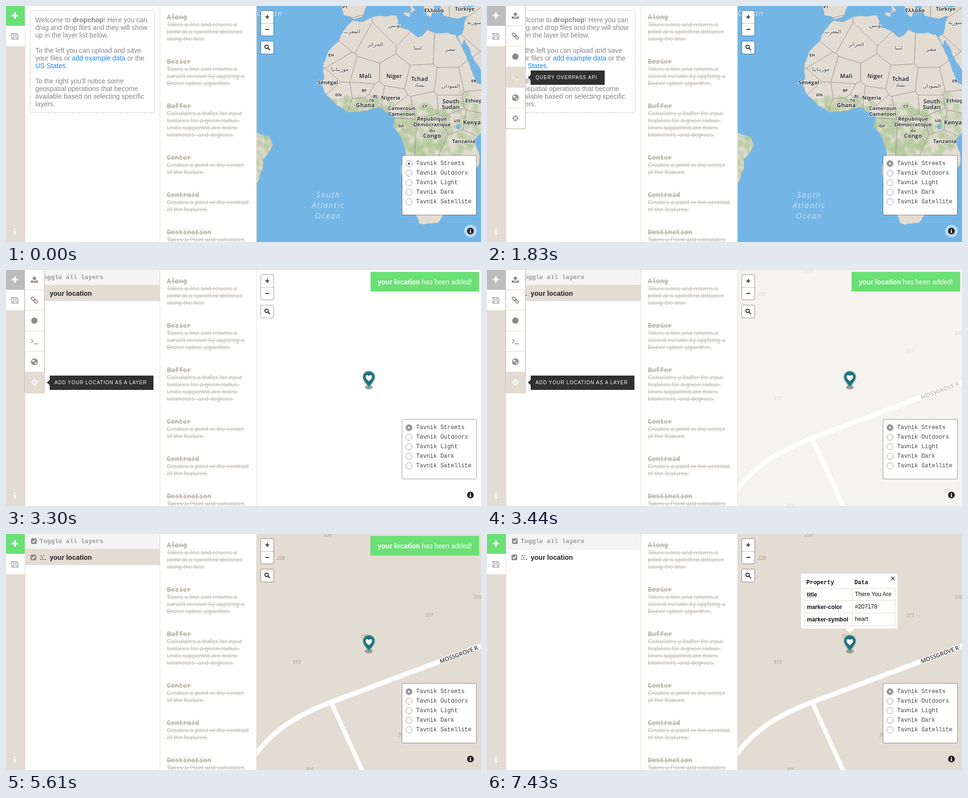
Animation of 989 by 494 pixels, one loop 8000 ms. Source, as an HTML page:

```html
<!DOCTYPE html>
<html lang="en">
<head>
<meta charset="utf-8">
<title>dropchop</title>
<style>
html, body { margin: 0; width: 100%; height: 100%; overflow: hidden; background: #fff; }
svg { display: block; width: 100%; height: 100%; }
text { font-family: 'Liberation Sans', Arial, sans-serif; font-size: 14px; white-space: pre; }
.b { font-weight: bold; }
.small { font-size: 12px; }
.mono { font-family: 'Liberation Mono', monospace; font-size: 12px; }
.desc { font-size: 12px; letter-spacing: .34px; text-decoration: line-through; }
.tip { font-size: 10px; letter-spacing: 1px; }
.place { font-family: 'Open Sans', 'DejaVu Sans', sans-serif; font-weight: bold; text-anchor: middle;
  stroke: #fffc; stroke-width: 2px; paint-order: stroke; stroke-linejoin: round; }
.height { font: italic 10px 'Open Sans', sans-serif; text-anchor: middle; }
.road { font: 600 12px 'Open Sans', sans-serif; stroke: #fff; stroke-width: 3px; paint-order: stroke; }
.sea { font: italic 16px 'Open Sans', sans-serif; letter-spacing: 2px; }
.line { fill: none; stroke: currentColor; }
</style>
</head>
<body>
<svg id="stage" viewBox="0 0 989 494"></svg>
<script>
const LOOP = 8000;
const SAND = '#e3dcd2', GREEN = '#6adf75', GREY = '#bcbcbc', SEA = '#73b6e6';

const text = (x, y, s, color, cls = '', more = '') =>
  `<text x="${x}" y="${y}" fill="${color}" class="${cls}" ${more}>${s}</text>`;
const rect = (x, y, w, h, color, more = '') =>
  `<rect x="${x}" y="${y}" width="${w}" height="${h}" fill="${color}" ${more}/>`;
const circle = (x, y, r, color, more = '') => `<circle cx="${x}" cy="${y}" r="${r}" fill="${color}" ${more}/>`;
const group = (id, body) => `<g id="${id}">${body}</g>`;
const at = (x, y, body, more = '') => `<g transform="translate(${x} ${y})" ${more}>${body}</g>`;
const stroke = (d, w) => `<path class="line" stroke-width="${w}" d="${d}"/>`;
const fill = d => `<path fill="currentColor" fill-rule="evenodd" d="${d}"/>`;
const bold = s => `<tspan class="b">${s}</tspan>`;
const repeat = (n, f) => Array.from({ length: n }, (_, i) => f(i)).join('');

let seed = 7;
const random = () => (seed = seed * 16807 % 2147483647) / 2147483647;
const polygon = pts => 'M' + pts.map(p => p.map(v => v.toFixed(1)).join(' ')).join('L') + 'Z';

// Coastlines: a few key points, roughened by midpoint displacement
const split = (a, b) => {
  const d = Math.hypot(b[0] - a[0], b[1] - a[1]);
  if (d < 5) return [a];
  const m = [0, 1].map(i => (a[i] + b[i]) / 2 + (random() - .5) * d * .16);
  return [...split(a, m), ...split(m, b)];
};
const coast = s => {
  const pts = s.split(',').map(p => p.trim().split(' ').map(Number));
  return polygon(pts.flatMap((p, i) => split(p, pts[(i + 1) % pts.length])));
};
const africa = `722 30,702 52,689 77,672 93,661 120,661 155,657 163,662 178,690 209,711 222,743 220,777 211,790 222,
  808 224,805 252,823 276,833 310,822 345,840 405,860 455,870 458,901 453,931 425,954 375,985 332,985 307,976 280,
  1010 236,1010 175,980 161,965 121,939 68,936 60,897 57,878 48,868 61,857 65,843 53,817 44,813 19,771 21,743 33`;
const eurasia = ['700 -5,703 20,717 22,722 27,742 22,753 -5', '840 -5,852 8,846 14,826 15,841 23',
  '868 -5,877 20,885 23,893 -5', '889 33,896 32,903 34',
  '905 -5,910 20,940 27,959 21,949 59,939 65,949 83,954 71,999 160,1010 -5'];
const brazil = '515 263,548 273,556 290,544 311,535 321,528 361,515 385';
const land = [africa, ...eurasia, brazil].map(coast).join('');

// Labels; a bar splits lines
const places = [
  [891, 9, 'Ελλάδα'], [955, 6, 'Türkiye'], [706, 1, 'PT'], [975, 34, 'سورية'], [809, 40, 'تونس'], [720, 53, 'المغرب'],
  [769, 80, 'الجزائر'], [857, 87, 'ليبيا'], [925, 90, 'مصر'], [677, 102, 'EH'], [695, 132, 'موريتانيا'], [748, 147, 'Mali'],
  [808, 147, 'Niger'], [861, 159, 'Tchad|تشاد'], [926, 167, 'السودان'], [974, 156, 'ER'], [670, 160, 'Sénégal'],
  [692, 185, 'GN'], [746, 176, 'BF'], [769, 188, 'BJ'], [761, 197, 'TG'], [748, 208, 'Ghana'], [801, 192, 'Nigeria'],
  [824, 220, 'Cameroun|Cameroon'], [872, 209, 'CF'], [926, 206, 'South|Sudan'], [979, 198, 'Ethiopia'],
  [887, 254, 'République|Démocratique|du|Congo'], [939, 239, 'UG'], [970, 244, 'Kenya'], [822, 250, 'GA'], [953, 283, 'Tanzania']
];
const label = ([x, y, s]) => s.split('|').map((line, i, all) => {
  const arabic = line > '\u0600', size = line.length < 3 ? 9 : line.length < 6 && !arabic ? 12 : 11;
  return text(x, y + 4 + 12 * (i - (all.length - 1) / 2), line, '#333', 'place',
    `style="font-size:${size}px${arabic ? ';font-weight:400' : ''}"`);
}).join('');

// Borders lie halfway between neighbouring labels
const nearer = (poly, a, b) => {
  const side = p => (p[0] - (a[0] + b[0]) / 2) * (b[0] - a[0]) + (p[1] - (a[1] + b[1]) / 2) * (b[1] - a[1]);
  return poly.flatMap((p, i) => {
    const q = poly[(i + 1) % poly.length], s = side(p), t = side(q), k = s / (s - t);
    const out = s <= 0 ? [p] : [];
    if (s * t < 0) out.push([p[0] + (q[0] - p[0]) * k, p[1] + (q[1] - p[1]) * k]);
    return out;
  });
};
const frame = [[560, -20], [1020, -20], [1020, 520], [560, 520]];
const borders = places.map(a => polygon(places.reduce((p, b) => a === b ? p : nearer(p, a, b), frame))).join('');

const forest = (x, y, rx, ry, n) => repeat(n, () => {
  const r = Math.sqrt(random()), a = random() * 2 * Math.PI;
  return circle((x + rx * r * Math.cos(a)).toFixed(1), (y + ry * r * Math.sin(a)).toFixed(1), (2 + 5 * random()).toFixed(1), '#adc997');
});
const world = rect(522, 0, 467, 494, SEA) + `<path d="${land}" fill="${SAND}"/>
  <g clip-path="url(#land)"><g filter="url(#soft)" fill-opacity=".42">` +
  forest(735, 207, 75, 16, 90) + forest(866, 256, 64, 52, 300) + forest(885, 315, 62, 35, 110) +
  forest(955, 240, 36, 62, 110) + forest(535, 315, 24, 55, 90) +
  `</g><path d="${borders}" fill="none" stroke="#a0949a" stroke-width=".8"/></g>
  <path d="${land}" fill="none" stroke="#6fa3c6" stroke-width=".5"/>` +
  circle(942, 253, 5, SEA) + places.map(label).join('') +
  text(522, 21, 'Ocean', '#c8e2f6', 'sea') +
  ['South', 'Atlantic', 'Ocean'].map((s, i) => text(671, 401 + 22 * i, s, '#c8e2f6', 'sea', 'text-anchor="middle"')).join('') +
  circle(967, 471, 13, '#fff', 'opacity=".5"');

const heights = [[670, 5, 230], [572, 54, 228], [982, 136, 319], [881, 174, 317], [746, 218, 315], [605, 272, 313], [825, 424, 307], [632, 497, 305]];
const street = rect(522, 0, 467, 494, SAND) +
  heights.map(([x, y, n]) => text(x, y, n, '#a8926f', 'height')).join('') +
  `<g fill="none" stroke="#fff"><path stroke-width="10" d="M516 466C560 405 612 377 677 352L995 232"/>
  <path stroke-width="9" d="M677 352L742 496"/></g>` +
  at(905, 271, text(0, 0, 'MOSSGROVE R', '#333', 'road', 'transform="rotate(-20.5)"'));

const marker = `<ellipse cx="755.5" cy="245.5" rx="8" ry="4.5" fill="#8a847c" opacity=".75"/>
  <path d="M755.5 246C752 238 743.5 233 743.5 224A12 12 0 0 1 767.5 224C767.5 233 759 238 755.5 246Z" fill="#207178" stroke="#62a3a6" stroke-width="2"/>
  <path d="M755.5 233C751 229 749 227 749 224A3.2 3.2 0 0 1 755.5 222.6A3.2 3.2 0 0 1 762 224C762 227 760 229 755.5 233Z" fill="#fff"/>`;

const cells = [['title', 'There You Are'], ['marker-color', '#207178'], ['marker-symbol', 'heart']];
const popup = rect(654, 83, 201, 115, '#fff', 'rx="3"') + '<path d="M745 197H766L755.5 207Z" fill="#fff"/>' +
  text(665, 105, 'Property', '#111', 'mono b') + text(765, 105, 'Data', '#111', 'mono b') +
  at(845, 93, stroke('M-3.5-3.5l7 7m0-7l-7 7', 1.5), 'color="#333"') +
  at(660.5, 113.5, stroke('M0 0h189v78h-189zM0 26h189M0 52h189M100 0v78', 1), 'color="#e0d9cf"') +
  cells.map(([key, value], i) => text(666, 131 + 26 * i, key, '#111', 'b small') +
    text(766, 130 + 26 * i, value, '#111', 'small')).join('');

// Map controls
const box = (x, y, w, h) => rect(x, y, w, h, '#000', 'rx="4" opacity=".4"') + rect(x + 1, y + 1, w - 2, h - 2, '#fff', 'rx="3"');
const styles = ['Streets', 'Outdoors', 'Light', 'Dark', 'Satellite'];
const controls = box(530, 9, 28, 54) + box(530, 73, 28, 28) + box(824, 312, 156, 126) + rect(531, 36, 26, 1, '#bbb') +
  at(544, 23, stroke('M-4 0h8M0-4v8M-4 26h8', 2), 'color="#333"') +
  at(542.5, 85.5, stroke('M2.5 2.5l4.5 4.5M-3.6 0a3.6 3.6 0 1 0 7.2 0a3.6 3.6 0 1 0-7.2 0', 2), 'color="#333"') +
  styles.map((s, i) => circle(839, 330 + 20 * i, 6.5, '#fff', `id="radio${i}" stroke="#969696"`) +
    text(854, 333 + 20 * i, 'Tavnik ' + s, '#444', 'mono')).join('') +
  circle(839, 330, 2, '#333', 'id="dot"') + circle(967, 471, 7, '#222') +
  at(967, 471, fill('M-1-4h2v2h-2zM-2-1h3v4h1v1h-4v-1h1v-3h-1z'), 'color="#fff"');

// Side panels
const link = s => `<tspan fill="#1485fb">${s}</tspan>`;
const intro = ['Welcome to ' + bold('dropchop') + '! Here you can', 'drag and drop files and they will show', 'up in the layer list below.', '',
  'To the left you can upload and save', `your files or ${link('add example data')} or the`, link('US States.'), '',
  'To the right you\'ll notice some', 'geospatial operations that become', 'available based on selecting specific', 'layers.'];
const welcome = rect(50.5, 9.5, 259, 214, 'none', 'rx="4" stroke="#b5b5b5" stroke-dasharray="3 2"') +
  intro.map((s, i) => text(61, 34 + 16 * i, s, '#858585')).join('');

const check = (x, y) => at(x, y, rect(0, 0, 12, 12, '#8c8c8c', 'rx="3"') + stroke('M3 6l2.3 2.5 4-5.5', 1.8), 'color="#fff"');
const layers = rect(40, 0, 280, 31, '#f4f4f4') + rect(40, 31, 280, 1, '#e2e2e2') +
  text(70, 19, 'Toggle all layers', '#999', 'mono b', 'style="font-size:13px"') +
  rect(40, 32, 280, 33, SAND, 'id="row"') + check(52, 9) + check(51, 43) +
  group('points', at(71, 45, stroke('M7 0h2M1 1h2M4 4h2M0 8h2M5 8h2M10 8h2', 2), 'color="#444"')) +
  text(91, 54, 'your location', '#222', 'b');

const tools = [['Along', 'Takes a line and returns a', 'point at a specified distance', 'along the line.'],
  ['Bezier', 'Takes a line and returns a', 'curved version by applying a', 'Bezier spline algorithm.'],
  ['Buffer', 'Calculates a buffer for input', 'features for a given radius.', 'Units supported are miles,', 'kilometers, and degrees.'],
  ['Center', 'Creates a point in the center', 'of the feature.'],
  ['Centroid', 'Creates a point in the centroid', 'of the features.'],
  ['Destination', 'Takes a Point and calculates']];
let y = 28;
const operations = tools.map(([name, ...lines]) => {
  let out = text(335, y, name, '#b8b2a9', 'mono b', 'style="font-size:14px" text-decoration="line-through"');
  for (const s of lines) out += text(335, y += 15, s, '#c0b9af', 'desc');
  y += 48;
  return out;
}).join('');

const bar = rect(0, 0, 40, 494, SAND) + rect(0, 0, 39, 41, GREEN, 'id="add"') + rect(0, 42, 39, 42, '#fff') +
  at(18.5, 20, stroke('M-6.5 0H6.5M0-6.5V6.5', 3.5), 'color="#fff"') +
  at(18.5, 63.5, stroke('M-6.5-6h10l3 3v9h-13zM-3.5-6v4h6v-4M-4 6v-4.5h8v4.5', 1.2), 'color="#888"') +
  at(18.5, 472, fill('M-1.5-6h3v3h-3zM-3-1.5h4.5v5.5h1.5v2h-6v-2h1.5v-3.5h-1.5z'), 'color="#fff"');

// Upload menu: hover start, tooltip width, tooltip, icon
const MENU_END = 5610;
const menuRows = [
  [1130, 284, 'UPLOAD FROM YOUR COMPUTER (.GEOJSON)', fill('M0-7L5-2H2V2H-2V-2H-5ZM-7.5 2H-3V4H3V2H7.5V6.5H-7.5Z')],
  [1620, 160, 'IMPORT FILE FROM URL', `<g transform="rotate(45)">${stroke('M-2-2.5h-3.5a2.5 2.5 0 0 0 0 5h3.5a2.5 2.5 0 0 0 0-5M2-2.5h3.5a2.5 2.5 0 0 1 0 5h-3.500a2.5 2.5 0 0 1 0-5', 1.8)}</g>`],
  [1690, 176, 'IMPORT FILE FROM A GIST', circle(0, 0, 6.5, 'currentColor')],
  [1830, 154, 'QUERY OVERPASS API', stroke('M-7-4l4.5 4-4.5 4M-1 5.5h9', 1.4)],
  [2250, 286, 'UPLOAD FROM A MAP FEATURE SERVICE URL', fill('M-7 0a7 7 0 1 0 14 0a7 7 0 1 0-14 0zM-5-3l4-2 2 3-3 3-2-1zM1 1h4l-2 4-2-1z')],
  [2670, 216, 'ADD YOUR LOCATION AS A LAYER', stroke('M0-7v5M0 2v5M-7 0h5M2 0h5M-4.5 0a4.5 4.5 0 1 0 9 0a4.5 4.5 0 1 0-9 0', 1.7)]
];
const menu = rect(38, 0, 43, 258, '#d5cec3', 'rx="4"') + rect(38, 0, 1.5, 254, GREY) + rect(39.5, 0, 39.5, 256, '#fff', 'rx="3"') +
  menuRows.map(([, , , icon], i) => at(39.5, 43 * i - 1, rect(0, 0, 40.5, 43, SAND, `id="hover${i}"`) +
    (i < 5 ? rect(0, 42, 40, 1, SAND) : '') + at(19.5, 21, icon, `id="icon${i}" color="#888"`))).join('');
const tips = menuRows.map(([, w, s], i) => group('tip' + i, at(91, 20 + 43 * i,
  rect(0, -14, w, 30, '#303030') + '<path d="M0-5L-6 .5L0 6Z" fill="#303030"/>' + text(10, 4, s, '#fff', 'tip')))).join('');

const notice = rect(759, 4, 226, 41, GREEN) + text(774, 30, bold('your location') + ' has been added!', '#fff');

document.getElementById('stage').innerHTML =
  `<defs><clipPath id="land"><path d="${land}"/></clipPath>
  <filter id="soft"><feGaussianBlur stdDeviation="1.5"/></filter></defs>` +
  rect(0, 0, 989, 494, '#fff') + group('world', world) + group('street', street) + group('marker', marker) + controls +
  group('popup', popup) + group('notice', notice) + rect(320, 0, 202, 494, '#fff') + operations +
  rect(320, 0, 1, 494, SAND) + rect(521, 0, 1, 494, SAND) +
  group('welcome', welcome) + group('layers', layers) + bar + group('menu', menu) + tips;

// Each step is [time, value, fade length]; no length means a hard change
function play(id, prop, first, ...steps) {
  const frames = [{ offset: 0, [prop]: first }];
  let value = first;
  for (const [time, next, fade = 0] of steps) {
    frames.push({ offset: time / LOOP, [prop]: value }, { offset: (time + fade) / LOOP, [prop]: next });
    value = next;
  }
  frames.push({ offset: 1, [prop]: value });
  document.getElementById(id).animate(frames, { duration: LOOP, iterations: Infinity });
}

play('radio0', 'fill', '#fff', [500, '#969696']);
play('dot', 'fill', '#333', [500, '#fff']);
play('add', 'fill', GREEN, [710, GREY], [MENU_END, GREEN]);
play('menu', 'opacity', 0, [710, 1], [MENU_END, 0]);
menuRows.forEach(([on], i) => {
  const off = i < 5 ? menuRows[i + 1][0] : MENU_END;
  play('hover' + i, 'opacity', 0, [on, 1], [off, 0]);
  play('tip' + i, 'opacity', 0, [on, 1], [off, 0]);
  play('icon' + i, 'color', '#888', [on, '#fff'], [off, '#888']);
});
play('welcome', 'opacity', 1, [3300, 0]);
play('layers', 'opacity', 0, [3300, 1]);
play('points', 'opacity', 0, [3370, 1]);
play('world', 'opacity', 1, [3300, 0]);
play('street', 'opacity', 0, [3330, 1, 310]);
play('marker', 'opacity', 0, [3300, 1]);
play('notice', 'opacity', 0, [3300, 1], [7010, 0]);
play('row', 'fill', SAND, [6450, '#fff']);
play('popup', 'opacity', 0, [7190, 1, 230]);
</script>
</body>
</html>
```
